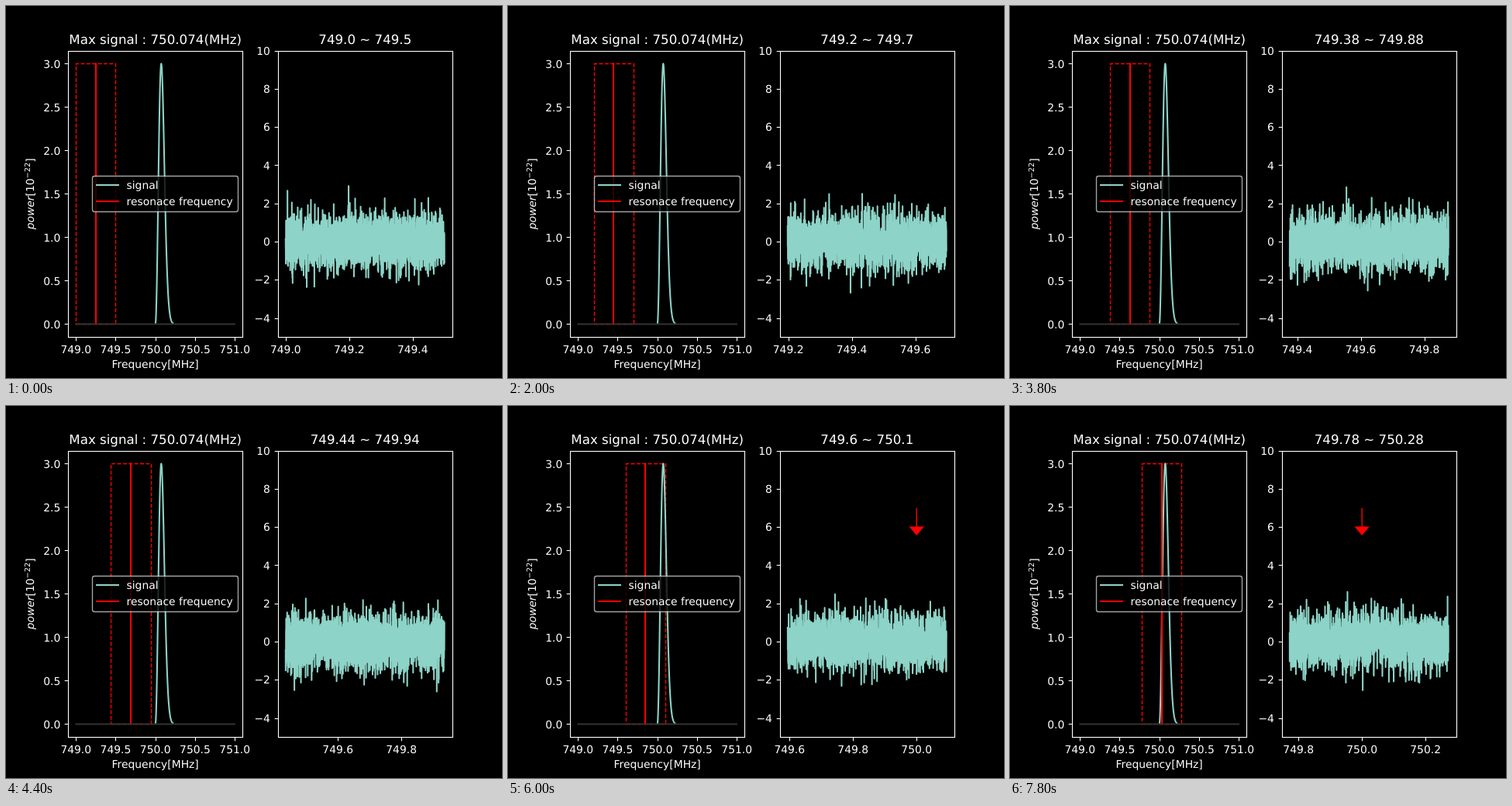
Animation, 640 px wide and 480 px high, one loop 8000 ms. Source, as an HTML page:

```html
<!DOCTYPE html>
<html lang="en">
<head>
<meta charset="utf-8">
<title>Resonance scan</title>
<style>
  html, body { margin: 0; width: 100%; height: 100%; overflow: hidden; background: #000; }
  svg { display: block; width: 640px; height: 480px; }
  text { font: 13.89px "DejaVu Sans", sans-serif; fill: #fff; text-rendering: geometricPrecision; white-space: pre; }
  .title { font-size: 16.67px; }
  .axis { stroke: #fff; stroke-width: 1.11; fill: none; }
  .teal { stroke: #8dd3c7; stroke-width: 2.08; fill: none; stroke-linejoin: round; }
  .red { stroke: #f00; stroke-width: 2; fill: none; }
  .window { stroke: #f00; stroke-width: 1.39; fill: none; stroke-dasharray: 5.14 2.22; }
</style>
</head>
<body>
<svg id="stage" viewBox="0 0 640 480"></svg>
<script>
const STEP_MS = 200, STEPS = 40, START = 749, SPAN = 0.5;
const TOP = 57.6, BOTTOM = 427.2, WIDTH = 225.45;
const LEFT = 80, RIGHT = 350.55;
const POINTS = 2500, SIGMA = 0.75;

const stage = document.getElementById('stage');
const snap = v => Math.floor(v + 0.5) + 0.5;
const powerX = f => 90.25 + (f - START) * 102.48;
const powerY = p => 410.4 - p * 112;
const noiseY = v => 304 - v * 24.64;

function add(tag, attrs, parent = stage) {
  const node = document.createElementNS('http://www.w3.org/2000/svg', tag);
  for (const key in attrs) node.setAttribute(key, attrs[key]);
  return parent.appendChild(node);
}

function label(content, x, y, anchor = 'middle', cls = '') {
  const node = add('text', { x, y, 'text-anchor': anchor, class: cls });
  node.textContent = content;
  return node;
}

function drawFrame(left) {
  const x = snap(left), y = snap(TOP);
  add('rect', { class: 'axis', x, y, width: snap(left + WIDTH) - x, height: snap(BOTTOM) - y });
}

function yTick(left, y, content) {
  add('path', { class: 'axis', d: `M${snap(left)} ${snap(y)}h-4.86` });
  label(content, left - 9.7, y + 5.2, 'end');
}

function xTick(content) {
  const mark = add('path', { class: 'axis' });
  const text = label(content, 0, 447.8);
  return (x, value) => {
    mark.setAttribute('d', `M${snap(x)} ${snap(BOTTOM)}v4.86`);
    text.setAttribute('x', x);
    text.textContent = value;
  };
}

// Maxwell-like line shape with unit peak at 750.074
function lineShape(f) {
  const u = (f - 750) / 0.074;
  return u > 0 ? u * u * Math.exp(1 - u * u) : 0;
}

function randomFrom(seed) {
  return () => {
    seed = (seed + 0x6D2B79F5) | 0;
    let t = Math.imul(seed ^ (seed >>> 15), 1 | seed);
    t = (t + Math.imul(t ^ (t >>> 7), 61 | t)) ^ t;
    return ((t ^ (t >>> 14)) >>> 0) / 4294967296;
  };
}

function noisePath(step, start) {
  const random = randomFrom(step * 977 + 5);
  const centre = start + SPAN / 2;
  const points = [];
  for (let i = 0; i < POINTS; i++) {
    const part = i / (POINTS - 1), f = start + part * SPAN;
    const gauss = Math.sqrt(-2 * Math.log(1 - random())) * Math.cos(2 * Math.PI * random());
    const bump = lineShape(f) * Math.exp(-(((f - centre) / 0.03) ** 2));
    points.push((360.8 + part * 204.95).toFixed(2) + ' ' + noiseY(SIGMA * gauss + bump).toFixed(1));
  }
  return 'M' + points.join('L');
}

// Power panel
add('rect', { width: 640, height: 480 });
const windowBox = add('path', { class: 'window' });
const curve = [];
for (let f = 750; f <= 750.23; f += 0.002) curve.push(powerX(f).toFixed(2) + ' ' + powerY(3 * lineShape(f)).toFixed(2));
add('path', { class: 'teal', d: 'M' + curve.join('L') });
const resonance = add('path', { class: 'red' });
add('path', { d: `M89.5 410.4H296`, stroke: '#333', 'stroke-width': 2 });
drawFrame(LEFT);
for (let i = 0; i <= 6; i++) yTick(LEFT, powerY(i / 2), (i / 2).toFixed(1));
for (let i = 0; i <= 4; i++) {
  const f = START + i / 2;
  xTick('')(powerX(f), f.toFixed(1));
}
label('Max signal : 750.074(MHz)', 192.7, 49.3, 'middle', 'title');
label('Frequency[MHz]', 192.7, 466.8);
const power = add('text', { transform: 'translate(35.5 242.4) rotate(-90)', 'text-anchor': 'middle' });
add('tspan', { 'font-style': 'oblique' }, power).textContent = 'power';
add('tspan', {}, power).textContent = '[10';
add('tspan', { dy: -5, style: 'font-size:9.72px' }, power).textContent = '\u221222';
add('tspan', { dy: 5 }, power).textContent = ']';

// Legend
add('rect', { x: 111.5, y: 219.5, width: 188, height: 46, rx: 2.8, fill: '#000', stroke: '#ccc',
  'stroke-width': 1.39, opacity: 0.8 });
add('path', { class: 'teal', d: 'M116 231H146' });
add('path', { class: 'red', d: 'M116 252H146' });
label('signal', 155.5, 236, 'start');
label('resonace frequency', 155.5, 257, 'start');

// Noise panel
const noise = add('path', { class: 'teal' });
const arrow = add('path', { d: 'M0 131.5V156.2H-8.2L0 166L8.2 156.2H0', fill: '#f00', stroke: '#f00', 'stroke-width': 1.39 });
drawFrame(RIGHT);
for (let v = -4; v <= 10; v += 2) yTick(RIGHT, noiseY(v), String(v).replace('-', '\u2212'));
const scanTicks = [xTick(''), xTick(''), xTick('')].map((place, i) => ({
  place, group: [stage.children[stage.children.length - 6 + 2 * i], stage.children[stage.children.length - 5 + 2 * i]]
}));
const range = label('', 463.3, 49.3, 'middle', 'title');

const shortNumber = v => v.toFixed(2).replace(/0$/, '');
const paths = [];

function show(step) {
  const low = START + step * 0.02, high = low + SPAN;
  const dataLow = START + step * 0.0198;
  const scanX = f => 360.8 + (f - dataLow) * 409.9;

  const x0 = snap(powerX(low)), x1 = snap(powerX(high));
  windowBox.setAttribute('d', `M${x0} 410.5H${x1}V74.5H${x0}Z`);
  resonance.setAttribute('d', `M${Math.round(powerX(low + SPAN / 2))} 73.4V411`);
  range.textContent = `${shortNumber(low)} ~ ${shortNumber(high)}`;

  const first = Math.ceil((dataLow - 0.025) * 5 - 1e-6);
  scanTicks.forEach(({ place, group }, i) => {
    const f = (first + i) / 5;
    place(scanX(f), f.toFixed(1));
    const visible = f <= dataLow + SPAN + 0.025 + 1e-6;
    group.forEach(node => node.setAttribute('visibility', visible ? 'visible' : 'hidden'));
  });

  noise.setAttribute('d', paths[step] ||= noisePath(step, dataLow));
  arrow.setAttribute('visibility', step > 25 ? 'visible' : 'hidden');
  arrow.setAttribute('transform', `translate(${scanX(750)} 0)`);
}

const began = performance.now();
let shown = -1;
function tick() {
  const step = Math.floor((performance.now() - began) / STEP_MS) % STEPS;
  if (step !== shown) show(shown = step);
  requestAnimationFrame(tick);
}
tick();
</script>
</body>
</html>
```
